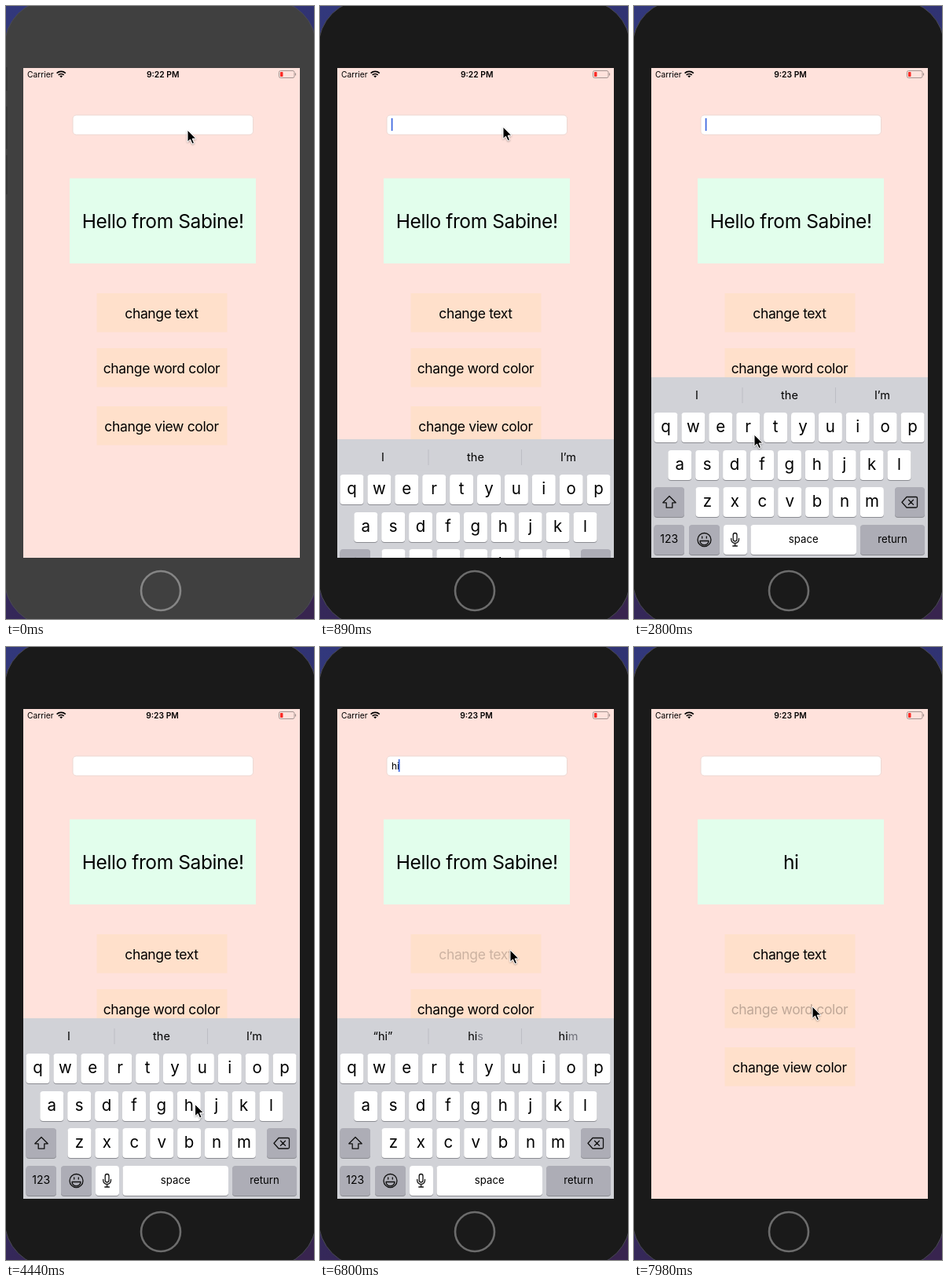
An HTML page for the animation above (8000 ms loop, 392 by 781 pixels).

```html
<!DOCTYPE html>
<html lang="en">
<head>
<meta charset="utf-8">
<title>Phone text demo</title>
<style>
  html, body { margin: 0; width: 100%; height: 100%; overflow: hidden; background: #2f3370; }
  svg { display: block; width: 100%; height: 100%; }
  text { font-family: Inter, Roboto, sans-serif; text-anchor: middle; white-space: pre; }
  .start { text-anchor: start; }
  .label { font-size: 17.5px; letter-spacing: -.35px; }
  .icon { fill: none; stroke: #111; stroke-width: 1.3; stroke-linejoin: round; stroke-linecap: round; }
</style>
</head>
<body>
<svg viewBox="0 0 392 781" preserveAspectRatio="none">
  <defs>
    <linearGradient id="desk" x1="0" y1="0" x2=".4" y2="1">
      <stop offset="0" stop-color="#32387c"/><stop offset=".6" stop-color="#2f2f6c"/><stop offset="1" stop-color="#38244f"/>
    </linearGradient>
    <clipPath id="screen"><rect x="22" y="79" width="352" height="624"/></clipPath>
    <filter id="soft" x="-50%" y="-50%" width="200%" height="200%">
      <feDropShadow dx="0" dy="1" stdDeviation="1" flood-opacity=".35"/>
    </filter>
  </defs>
  <rect width="392" height="781" fill="url(#desk)"/>
  <rect id="bezel" x="-2" y="-8" width="397" height="798" rx="60" stroke="#4a4a55"/>
  <path id="sideKeys" d="M.5 78v30M.5 128v54M.5 190v50" stroke="#333" stroke-width="2"/>
  <circle id="home" cx="197" cy="745" r="25" fill="none" stroke-width="2.6"/>

  <g clip-path="url(#screen)">
    <rect x="22" y="79" width="352" height="624" fill="#ffe2dc"/>
    <text class="start" x="27" y="91" font-size="10.3">Carrier</text>
    <g fill="none" stroke="#000" stroke-width="1.7">
      <path d="M64.6 85.6a8.2 8.2 0 0 1 11.2 0M66.7 87.9a5.2 5.2 0 0 1 7 0"/>
      <path d="M70.2 91.3l-1.9-2a2.8 2.8 0 0 1 3.8 0z" fill="#000" stroke="none"/>
    </g>
    <text id="clock" y="91" font-size="10.3" font-weight="600"></text>
    <rect x="347.5" y="82.5" width="19.5" height="9" rx="2" fill="none" stroke="#a49491"/>
    <path d="M368.5 85.5v3" stroke="#a49491" stroke-width="1.2"/>
    <rect x="349" y="84" width="3.5" height="6" rx=".7" fill="#fb2b26"/>

    <rect x="85" y="139" width="229.5" height="25" rx="4.5" fill="#fff" stroke="#ead5d0" stroke-width=".9"/>
    <text id="typed" class="start" x="91" y="155.5" font-size="12"></text>
    <rect id="caret" y="143" width="1.8" height="16" fill="#426be0"/>

    <rect x="81" y="219.5" width="237" height="108.5" fill="#e2feec"/>
    <text id="message" x="199.7" y="283" font-size="24.5" letter-spacing="-.4"></text>
    <g id="buttons"></g>

    <g id="keyboard">
      <g id="suggestions">
        <rect x="22" y="473" width="352" height="40" fill="#d1d2d7"/>
        <path d="M138 486v20M256.5 486v20" stroke="#bcbdc4"/>
        <g id="words" font-size="14.5"></g>
      </g>
      <rect x="22" y="512" width="352" height="192" fill="#d1d2d7"/>
      <g id="keys"></g>
      <path class="icon" d="M45 624.5l8.2 8.3h-4.4v6.4h-7.6v-6.4h-4.4z"/>
      <path class="icon" d="M347 625.5h12a1.5 1.5 0 0 1 1.5 1.5v10.500a1.500 1.500 0 0 1-1.500 1.500h-12l-6-6.750zM349.500 629.300l6 6M355.500 629.300l-6 6"/>
      <circle class="icon" cx="89.500" cy="680" r="8.500"/>
      <path d="M84 681.500h11a5.500 5.200 0 0 1-11 0z" class="icon"/>
      <path d="M86.700 676v2M92.300 676v2" class="icon" stroke-width="1.800"/>
      <rect class="icon" x="126.200" y="671.500" width="4.800" height="10.500" rx="2.400"/>
      <path class="icon" d="M123.700 678.500v1a4.900 4.900 0 0 0 9.800 0v-1M128.600 684.500v3.500M125.800 688h5.600"/>
    </g>
  </g>
  <path id="pointer" d="M0 0V15.200L3.500 12 6 17.600 8.500 16.500 6.100 11H10.800Z" stroke="#fff" stroke-width="1" filter="url(#soft)"/>
</svg>

<script>
const LOOP = 8000, STEP = 147.8;
const $ = id => document.getElementById(id);
const set = (id, attrs) => { for (const k in attrs) $(id).setAttribute(k, attrs[k]); };

// Buttons
$('buttons').innerHTML = [['text', 366], ['word color', 436], ['view color', 510]].map(([what, y]) =>
  `<rect x="115.500" y="${y}" width="166" height="49.500" fill="#ffe0cb"/>
   <text class="label" x="198" y="${y + 31.500}">change ${what}</text>`).join('');
const labels = $('buttons').querySelectorAll('text');

// Keyboard
const key = (x, y, w, text = '', size = 13.2, fill = '#fff') =>
  `<rect x="${x}" y="${y + 1}" width="${w}" height="38" rx="4" fill="#8b8c92"/>
   <rect x="${x}" y="${y}" width="${w}" height="38" rx="4" fill="${fill}"/>
   <text x="${x + w / 2}" y="${y + (size > 20 ? 25 : 23)}" font-size="${size}">${text}</text>`;
const row = (letters, x, y) => [...letters].map((c, i) => key(x + i * 34.9, y, 30, c, 20.500)).join('');
const GREY = '#adadb6';
$('keys').innerHTML =
  row('qwertyuiop', 25.500, 518) + row('asdfghjkl', 43.300, 566) + row('zxcvbnm', 78.500, 613) +
  key(25.500, 613, 38.500, '', 13, GREY) + key(332, 613, 38, '', 13, GREY) +
  key(25.500, 661, 38.500, '123', 14, GREY) + key(70, 661, 39, '', 13, GREY) +
  key(114, 661, 30) + key(148.500, 661, 134.500, 'space') + key(288, 661, 82, 'return', 13.2, GREY);

const grey = c => `<tspan fill="#70717a">${c}</tspan>`;
const suggest = words => words.map((w, i) => `<text x="${80 + 118 * i}" y="501">${w}</text>`).join('');
const idleWords = suggest(['I', 'the', 'I’m']);
const typedWords = suggest(['“hi”', 'hi' + grey('s'), 'hi' + grey('m')]);

// Pointer stops: time, x, y
const path = [
  [0, 231, 158], [150, 231, 158], [300, 233, 154], [1250, 233, 154], [1450, 245, 695],
  [1700, 245, 695], [1900, 211, 557], [2150, 211, 557], [2750, 153, 546], [3200, 153, 546],
  [3390, 200, 561], [3650, 200, 561], [4150, 295, 588], [4500, 235, 582], [4750, 235, 580],
  [5300, 280, 537], [6000, 280, 537], [6650, 242, 386], [7200, 242, 386], [7750, 227, 458], [LOOP, 227, 458]
];
const TAP_FIELD = 700, TYPE_H = 4700, TYPE_I = 5150, PRESS = 6650, RELEASE = 6800, PRESS_WORD = 7900;

const progress = (t, from, length) => Math.min(1, Math.max(0, (t - from) / length));
const easeOut = p => 1 - (1 - p) ** 2;
const smooth = p => p * p * (3 - 2 * p);

function pointerAt(t) {
  const i = Math.max(1, path.findIndex(p => p[0] >= t));
  const [t0, x0, y0] = path[i - 1], [t1, x1, y1] = path[i];
  const p = smooth(progress(t, t0, t1 - t0));
  return [x0 + (x1 - x0) * p, y0 + (y1 - y0) * p];
}

function draw(t) {
  const active = t > 100, sent = t >= RELEASE;
  set('bezel', { fill: active ? '#1a1a1a' : '#404040' });
  set('home', { stroke: active ? '#6c6c6c' : '#858585' });
  set('sideKeys', { opacity: active ? 0 : 1 });
  set('clock', { x: t < 1400 ? 199.700 : 199 });
  $('clock').textContent = t < 1400 ? '9:22 PM' : '9:23 PM';

  const text = sent || t < TYPE_H ? '' : t < TYPE_I ? 'h' : 'hi';
  $('typed').textContent = text;
  const blinkOn = (t - 1770 + 2 * 960) % 960 < 480;
  set('caret', { x: [90.700, 97.500, 99.800][text.length], opacity: +(t > TAP_FIELD && !sent && blinkOn) });
  $('message').textContent = sent ? 'hi' : 'Hello from Sabine!';

  const textAlpha = t < PRESS ? 1 : .2 + .8 * progress(t, RELEASE, 400);
  labels[0].setAttribute('opacity', textAlpha);
  labels[1].setAttribute('opacity', t < PRESS_WORD ? 1 : .25);

  const drop = sent ? 191 * easeOut(progress(t, RELEASE, 390))
                    : 231 * (1 - easeOut(progress(t, TAP_FIELD, 450)));
  set('keyboard', { transform: `translate(0 ${drop})` });
  set('suggestions', { opacity: sent ? 0 : 1 });
  $('words').innerHTML = t < TYPE_I ? idleWords : typedWords;

  set('pointer', { transform: `translate(${pointerAt(t)})` });
}

let shown = -1;
function tick() {
  const step = Math.floor((performance.now() % LOOP + 12) / STEP);
  if (step !== shown) draw((shown = step) * STEP);
  requestAnimationFrame(tick);
}
tick();
</script>
</body>
</html>
```
